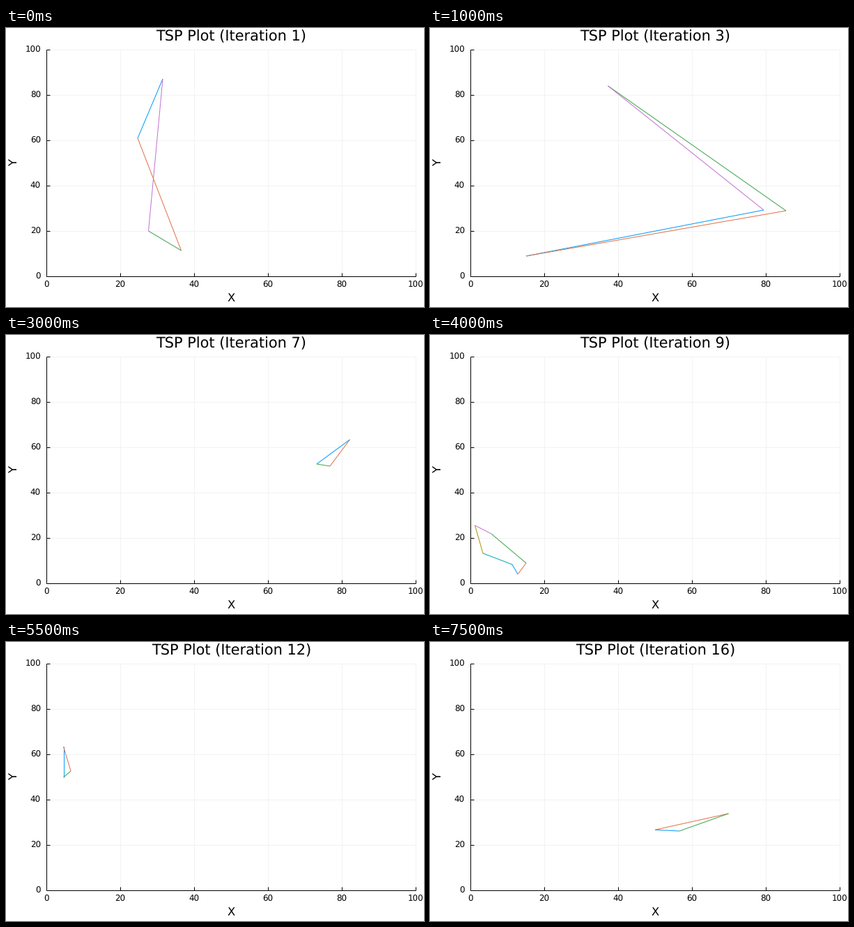
Recreate the animation shown at these times as a matplotlib script. Size 600 by 400 pixels, loop 8000 ms.

```python
from itertools import permutations

import matplotlib.pyplot as plt
import numpy as np
from matplotlib.animation import FuncAnimation

W, H, DPI = 600, 400, 100
PX = 72 / DPI
LEFT, RIGHT, TOP, BOTTOM = 58, 588, 31, 356
COLORS = ["#009afa", "#e36f47", "#3ea44e", "#c371d2", "#ac8e18", "#00aaae"]

# Cities as x + yj in stage pixels
CITIES = [
    118 + 329j, 126 + 343j, 217 + 140j,
    225 + 73j, 189 + 158j, 251.5 + 319j, 204.5 + 291j,
    479 + 261j, 138 + 327j, 511 + 262j, 255.5 + 83j,
    164 + 155j, 446 + 185j, 493.5 + 150j, 465 + 188j,
    88 + 285j, 64.5 + 273j, 76 + 313j,
    82.5 + 194j, 82.5 + 150j, 93 + 185j,
    358 + 271j, 323 + 269.3j, 428.5 + 246j,
]

# Hubs around which the subtours form
SW, WEST, EDGE, SOUTH, MID = CITIES[0], CITIES[4], CITIES[20], CITIES[21], CITIES[14]
EAST, CENTRE, INNER, NORTH = RINGS = [558 + 137j, 268 + 290j, 222 + 268j, 388 + 151j]

# Three more cities circle each ring hub
CITIES += [hub + 18 * np.exp(1j * np.radians(a))
           for hub in RINGS for a in (-50, 70, 190)]


def length(tour):
    return round(sum(abs(a - b) for a, b in zip(tour, tour[1:] + tour[:1])), 6)


def subtour(hub, n=3):
    """Shortest closed tour through the n cities nearest to hub."""
    near = sorted(CITIES, key=lambda c: abs(c - hub))[:n]
    first, *rest = [c for c in CITIES if c in near]
    return min(([first, *p] for p in permutations(rest)), key=length)


TOURS = [
    CITIES[3:7], subtour(SW), CITIES[7:11], subtour(EAST),
    subtour(WEST), subtour(CENTRE, 4), subtour(MID), subtour(SOUTH),
    subtour(SW, 6), subtour(EAST, 4), subtour(EAST), subtour(EDGE),
    subtour(INNER, 4), subtour(EAST), subtour(NORTH), subtour(SOUTH),
]

plt.rcParams["font.family"] = "DejaVu Sans"
plt.rcParams["text.hinting"] = "no_hinting"
fig = plt.figure(figsize=(W / DPI, H / DPI), dpi=DPI, facecolor="white")
ax = fig.add_axes([0, 0, 1, 1])
ax.set_xlim(0, W)
ax.set_ylim(H, 0)
ax.axis("off")


def stroke(xs, ys, color, z=2):
    return ax.plot(xs, ys, color=color, lw=PX, zorder=z,
                   solid_capstyle="butt")[0]


def label(x, y, text, size, ha="center", **kw):
    return ax.text(x, y, text, fontsize=size * 15 / 14, ha=ha,
                   va="baseline", color="black", **kw)


def draw_axes():
    for v in range(0, 101, 20):
        x = LEFT + (RIGHT - LEFT) * v / 100
        y = BOTTOM - (BOTTOM - TOP) * v / 100
        if v:
            stroke([x, x], [TOP, BOTTOM], "#f2f2f2", 1)
            stroke([LEFT, RIGHT], [y, y], "#f2f2f2", 1)
        stroke([x, x], [BOTTOM, BOTTOM - 5], "black")
        stroke([LEFT, LEFT + 5], [y, y], "black")
        label(x, 372, str(v), 8)
        label(50, y + 4, str(v), 8, ha="right")
    stroke([LEFT, LEFT], [TOP, BOTTOM], "black")
    stroke([LEFT, RIGHT], [BOTTOM, BOTTOM], "black")
    label((LEFT + RIGHT) / 2, 392, "X", 11)
    label(16, (TOP + BOTTOM) / 2, "Y", 11, rotation=90,
          rotation_mode="anchor")


draw_axes()
title = label(323.5, 18, "", 14)
edges = [stroke([], [], c, 3) for c in COLORS]


def update(i):
    tour = TOURS[i]
    title.set_text(f"TSP Plot (Iteration {i + 1})")
    for k, edge in enumerate(edges):
        ends = [tour[k], tour[(k + 1) % len(tour)]] if k < len(tour) else []
        edge.set_data(np.real(ends), np.imag(ends))
    return [title, *edges]


anim = FuncAnimation(fig, update, frames=len(TOURS), interval=500,
                     init_func=lambda: update(0), repeat=True,
                     repeat_delay=0, blit=False)
plt.show()
```
